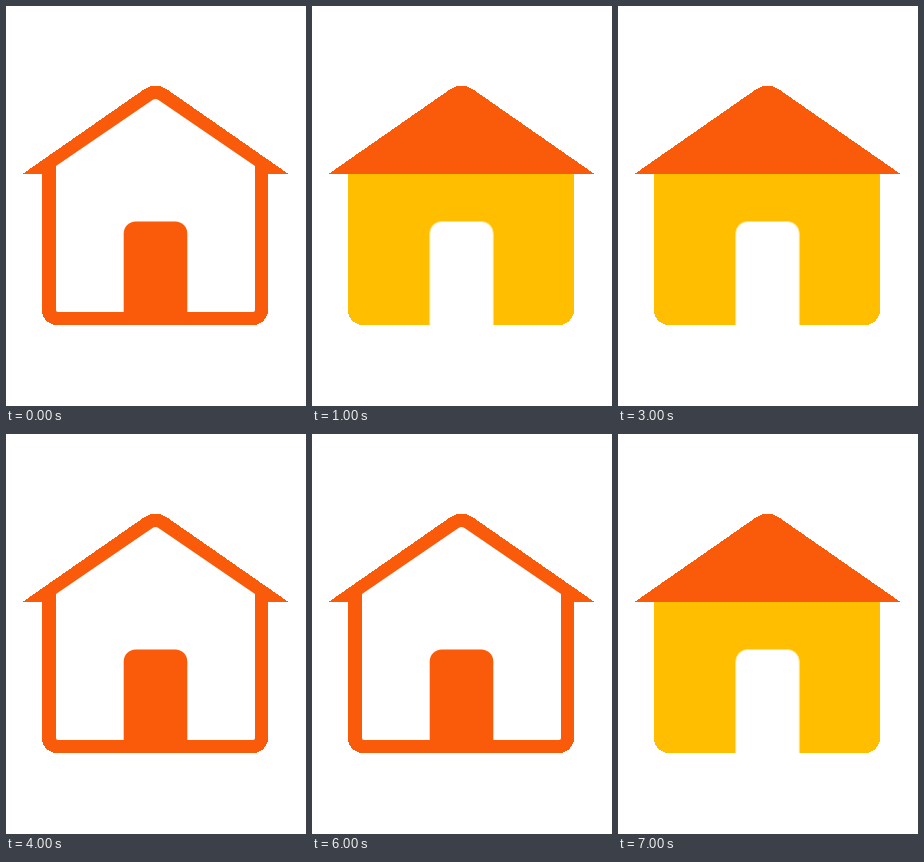
Recreate the animation shown at these times as an HTML page. Size 300 px wide and 400 px high, loop 8 s.

```html
<!DOCTYPE html>
<html lang="en">
<head>
<meta charset="utf-8">
<title>House</title>
<style>
  html, body { margin: 0; width: 100%; height: 100%; overflow: hidden; background: #fff; }
  svg { display: block; width: 100%; height: 100%; }
  .wall, .roof { shape-rendering: crispEdges; }
  .wall { animation: wall 2s step-end infinite; }
  .room { fill: #fff; animation: room 2s step-end infinite; }
  .door { animation: door 2s step-end infinite; }
  .roof { fill: #f95b0a; }
  @keyframes wall { 0% { fill: #f95b0a; } 50%, 100% { fill: #ffbe00; } }
  @keyframes room { 0% { visibility: visible; } 50%, 100% { visibility: hidden; } }
  @keyframes door {
    0% { fill: #f95b0a; stroke: transparent; }
    50%, 100% { fill: #fff; stroke: #ffe08a; }
  }
</style>
</head>
<body>
<svg viewBox="0 0 300 400">
  <path class="wall" d="M36 167H262V304A15 15 0 0 1 247 319H51A15 15 0 0 1 36 304Z"/>
  <path class="roof" d="M16.5 168L138 83.4Q149.5 76 161 83.4L282.5 168Z"/>
  <path class="room" d="M50 160L146.5 94Q149.5 92 152.5 94L249 160V304Q249 306 247 306H52Q50 306 50 304Z"/>
  <path class="door" d="M117.7 319V227.5A12 12 0 0 1 129.7 215.5H169.3A12 12 0 0 1 181.3 227.5V319"/>
</svg>
</body>
</html>
```
